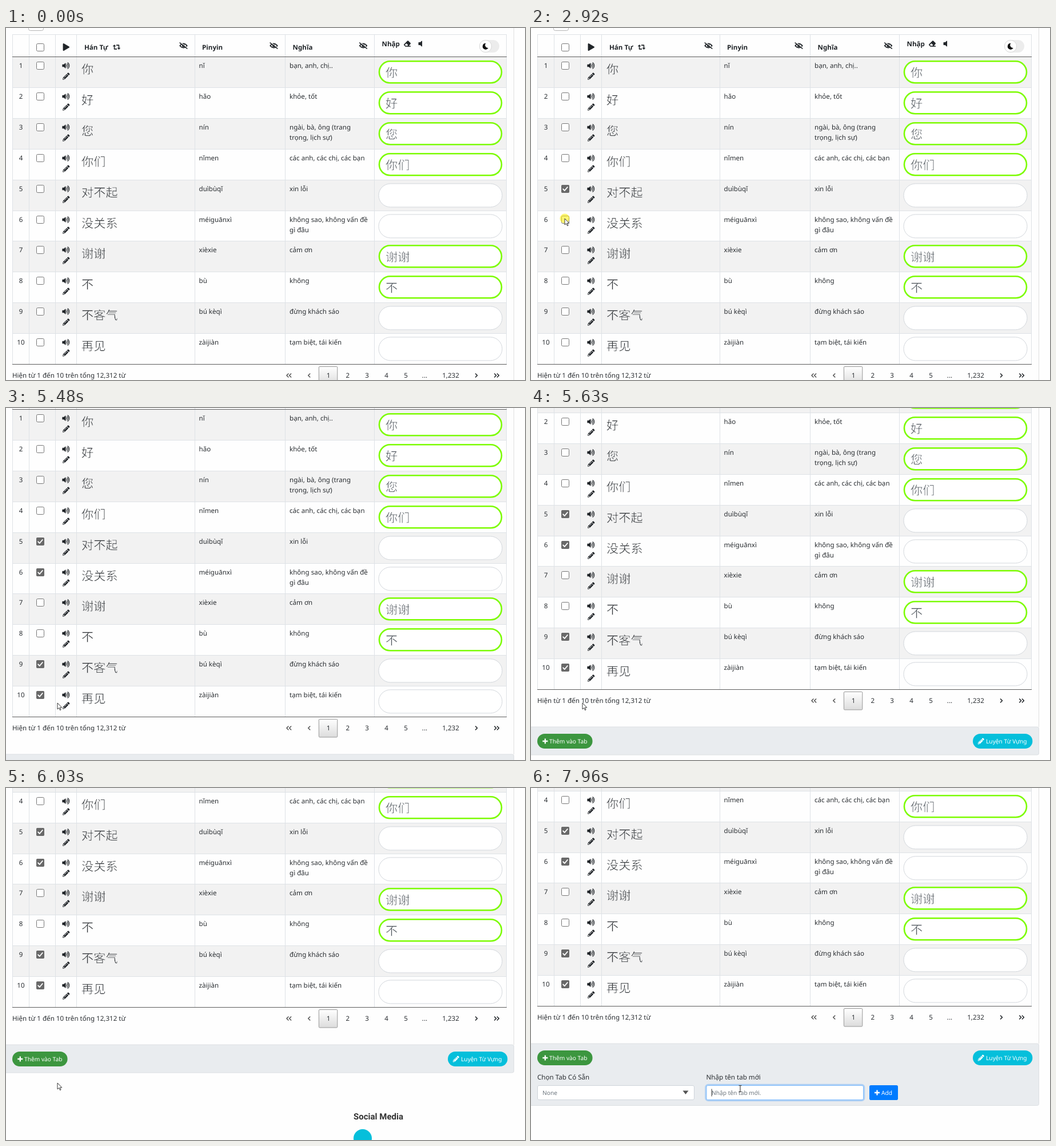
Write an HTML page that moves like this. It is 908x617 px and loops after 7990 ms.

```html
<!DOCTYPE html>
<html lang="vi">
<head>
<meta charset="utf-8">
<title>Vocabulary table</title>
<style>
  html, body { margin: 0; width: 100%; height: 100%; overflow: hidden; background: #fefefe; }
  svg { display: block; width: 908px; height: 617px; }
  text { font: 11.6px "Noto Sans", "Open Sans", sans-serif; fill: #2a2e32;
         text-rendering: geometricPrecision; white-space: pre; }
  .b { font-weight: 700; fill: #212529; }
  .s { font-size: 10.2px; }
  .w { fill: #fff; }
  .m { text-anchor: middle; }
  .g { fill: #6c757d; }
  /* a paper-coloured stroke thins the strokes of the characters */
  .zh { font: 300 21.2px "Noto Sans CJK SC", "Noto Sans CJK", "Noto Sans CJK JP", sans-serif;
        stroke: #fefefe; stroke-width: .6; }
  .odd { stroke: #f2f2f2; }
  .in { fill: #495057; stroke: #fff; }
  .soc { font: 700 15px Roboto, sans-serif; fill: #333; }
</style>
</head>
<body>
<svg id="stage" viewBox="0 0 908 617" xmlns="http://www.w3.org/2000/svg"></svg>
<script>
const LOOP = 7990, PITCH = 53.9, GROW = 59.5, FOOT = 655;
const INK = '#212529', LINE = '#dee2e6', DARK = '#5c5c5c';

const rows = [
  ['你', 'nǐ', 'bạn, anh, chị..', 1],
  ['好', 'hǎo', 'khỏe, tốt', 1],
  ['您', 'nín', 'ngài, bà, ông (trang|trọng, lịch sự)', 1],
  ['你们', 'nǐmen', 'các anh, các chị, các bạn', 1],
  ['对不起', 'duìbùqǐ', 'xin lỗi', 0],
  ['没关系', 'méiguānxì', 'không sao, không vấn đề|gì đâu', 0],
  ['谢谢', 'xièxie', 'cảm ơn', 1],
  ['不', 'bù', 'không', 1],
  ['不客气', 'bú kèqì', 'đừng khách sáo', 0],
  ['再见', 'zàijiàn', 'tạm biệt, tái kiến', 0]
];

// start, end, x, y, sideways bend
const moves = [
  [90, 880, 48, 311, 0], [900, 1080, 56, 275, 0], [1080, 1170, 58, 281, 0],
  [2050, 2630, 59, 331, 2], [2680, 2710, 59, 334, 0],
  [3320, 4070, 61, 496, 13], [4380, 4850, 65, 546, 0], [4850, 4960, 63, 548, 0],
  [5190, 5350, 90, 517, 0], [6150, 6580, 75, 471, 0], [6990, 7360, 366, 527, 0]
];
const clicks = [1840, 2920, 4170, 4980, 6600, 7540], HOLD = 190;
const checks = { 5: 2030, 6: 3110, 9: 4360, 10: 5170 };
const scrolls = [[5330, 0], [5630, 95.5], [5820, 154], [6030, 205], [6090, 207]];

// Icon outlines on a 512 grid
const speaker = 'M215 71L126 160H24q-24 0-24 24v144q0 24 24 24h102l89 89c15 15 41 4 41-17V88c0-21-26-32-41-17z';
const pencil = 'M498 142l-46 46q-9 8-17 0L324 77q-8-9 0-17l46-46q34-28 68 0l60 60q28 34 0 68zM284 100L22 362 0 484q0 28 28 28l122-22 262-262q8-9 0-17L301 100q-9-8-17 0zM124 340q-8-10 0-20l154-154q10-8 20 0q8 10 0 20L144 340q-10 8-20 0zM88 424h48v36l-64 11-31-31 11-64h36z';
const eraser = 'M498 274c19-19 19-49 0-68L338 46c-19-19-49-19-68 0L14 302c-19 19-19 49 0 68l96 96c9 9 21 14 34 14h356q12 0 12-12v-40q0-12-12-12H376zM195 239l118 118-50 59H152l-80-80z';
const plus = 'M416 208H272V64h-96v144H32v96h144v144h96V304h144z';
const play = 'M424 215L72 7C44-10 0 6 0 48V464c0 38 41 60 72 41l352-208c32-18 32-64 0-82z';

const rect = (x, y, w, h, fill, more = '') =>
  `<rect x="${x}" y="${y}" width="${w}" height="${h}" fill="${fill}" ${more}/>`;
const text = (x, y, s, cls = '') => `<text x="${x}" y="${y}" class="${cls}">${s}</text>`;
const path = (d, fill, more = '') => `<path d="${d}" fill="${fill}" ${more}/>`;
const stroke = (d, w, color = INK) =>
  path(d, 'none', `stroke="${color}" stroke-width="${w}" stroke-linecap="round" stroke-linejoin="round"`);
const icon = (body, w, cx, cy, k = .024) =>
  `<g transform="translate(${cx} ${cy}) scale(${k}) translate(${-w / 2} -256)">${body}</g>`;
const glyph = (d, w, cx, cy, k, fill = INK) => icon(path(d, fill, 'fill-rule="evenodd"'), w, cx, cy, k);

const volume = (x, y) => icon(path(speaker, INK) +
  stroke('M308 200a67 67 0 0 1 0 112M353 117a165 165 0 0 1 0 278M397 40a258 258 0 0 1 0 432', 46), 576, x, y);
const hidden = (x, y) => icon(
  stroke('M40 256Q320-60 600 256Q320 572 40 256z', 78) +
  `<circle cx="320" cy="256" r="112" fill="${INK}"/>` +
  stroke('M75 0L645 445', 46, '#fefefe') + stroke('M34 30L606 482', 64), 640, x, y, .0225);
const swap = (x, y) => icon(
  stroke('M320 400H152V160M320 112H488V352', 66) +
  path('M30 200L152 60 274 200zM366 312L488 452 610 312z', INK), 640, x, y, .0235);

const box = (y) => rect(53.5, y - 6.5, 13, 13, '#fff', 'rx="2" stroke="#767676"');
const tick = (n, y) => `<g id="tick${n}">` + rect(53, y - 7, 14, 14, '#696969', 'rx="2"') +
  stroke(`M56.2 ${y + .3}l2.6 2.7 5-6`, 1.9, '#fff') + '</g>';

function header() {
  return rect(39.5, -10, 26, 14.5, '#fff', 'rx="3" stroke="#b5b5b5"') +
    rect(11, 11, 865, 1, LINE) + box(34) + glyph(play, 448, 105.3, 33.5, .0255) +
    text(137, 38, 'Hán Tự', 'b') + swap(193.5, 33.5) + hidden(310.5, 31) +
    text(343, 38, 'Pinyin', 'b') + hidden(468.5, 31) +
    text(501.5, 38, 'Nghĩa', 'b') + hidden(625, 31) +
    text(657.5, 32, 'Nhập', 'b') + glyph(eraser, 512, 702, 27.5, .0235) +
    glyph(speaker, 256, 724.8, 27.5, .0255) +
    rect(828, 21, 35, 22, '#ececec', 'rx="11"') +
    '<circle cx="839" cy="32" r="10.6" fill="#fff" stroke="#d0d0d0" stroke-width=".8"/>' +
    path('M839.6 26.8a5.4 5.4 0 1 0 4.2 8.2a4.9 4.9 0 0 1-4.2-8.2z', '#111');
}

function row([zh, py, vi, done], i) {
  const o = Math.round(i * PITCH), n = i + 1, cy = 66 + o;
  const [a, b] = vi.split('|');
  const pill = done
    ? rect(653, 58.3 + o, 214, 38, '#fff', 'rx="19" stroke="#7cfc00" stroke-width="2.6"')
    : rect(652, 56.9 + o, 216, 41, '#fff', 'rx="20.5" stroke="#d3d7dc"');
  return text(26, 70 + o, n, 'm') + box(cy) + (checks[n] ? tick(n, cy) : '') +
    volume(105.3, cy) + glyph(pencil, 512, 105.3, 84.5 + o) +
    text(132, 80 + o, zh, i % 2 ? 'zh' : 'zh odd') + text(337.5, 70 + o, py) + text(496, 70 + o, a) +
    (b ? text(496, 88 + o, b) : '') + pill + (done ? text(664, 85.5 + o, zh, 'zh in') : '');
}

function table() {
  let s = '';
  rows.forEach((_, i) => {
    const y = 50 + Math.round(i * PITCH);
    if (i % 2 === 0) s += rect(11, y, 865, 54, '#f2f2f2');
  });
  rows.forEach((_, i) => { if (i) s += rect(11, 50 + Math.round(i * PITCH), 865, 1, LINE); });
  for (const x of [11, 40, 86, 123, 330, 488, 644, 875]) s += rect(x, 11, 1, 578, LINE);
  return s + rect(11, 50, 865, 1, DARK) + rect(11, 589, 865, 1, DARK) + header() + rows.map(row).join('');
}

function pager() {
  const chev = (x, d, c) => stroke(`M${x + 1.5 * d} 606L${x - 1.5 * d} 609L${x + 1.5 * d} 612`, 1.6, c);
  let s = text(11, 613, 'Hiện từ 1 đến 10 trên tổng 12,312 từ') +
    rect(547.4, 593.5, 32.4, 31.5, 'url(#page)', 'rx="1.5" stroke="#979797"');
  [['1', 564], ['2', 597.7], ['3', 631.5], ['4', 665.5], ['5', 699.5], ['...', 732.5], ['1,232', 778]]
    .forEach(([n, x]) => s += text(x, 613, n, 'm'));
  return s + chev(492.5, 1, '#555') + chev(497.2, 1, '#555') + chev(530.3, 1, '#555') +
    chev(823, -1, INK) + chev(856.2, -1, INK) + chev(860.9, -1, INK);
}

function footer() {
  return rect(888, 0, 1, FOOT, '#dfdfdf') +
    `<rect id="foot" x="-5" y="${FOOT}" width="893.5" height="49" rx="3" fill="#e9ecef" stroke="#dcdfe2"/>` +
    rect(9.8, 665.8, 99, 28.4, '#28a745', 'id="ring" rx="14.2" fill-opacity=".5"') +
    rect(11, 667, 96.6, 26, '#3c963f', 'rx="13"') + glyph(plus, 448, 24.8, 680, .0235, '#fff') +
    text(32, 684, 'Thêm vào Tab', 's w') +
    rect(773, 667, 104.4, 26, '#05bfdb', 'rx="13"') + glyph(pencil, 512, 787.3, 680, .0215, '#fff') +
    text(796, 684, 'Luyện Từ Vựng', 's w');
}

// Drawn at its open position, 207px above page coordinates
function panel() {
  return '<g clip-path="url(#slide)"><g transform="translate(0 207)">' +
    text(11, 510.5, 'Chọn Tab Có Sẵn') + rect(11.5, 521.5, 274, 25, '#fff', 'rx="2.5" stroke="#ced4da"') +
    text(20, 537.8, 'None', 's g') + path('M265.5 530.5h10l-5 6.5z', '#555') +
    text(306.5, 510.5, 'Nhập tên tab mới') +
    rect(306.5, 521, 275.5, 26, 'none', 'id="glow" rx="3.5" stroke="#007bff" stroke-opacity=".25" stroke-width="4.5"') +
    rect(307, 521.5, 274.5, 25, '#fff', 'id="field" rx="2.5" stroke="#ced4da"') +
    text(316, 537.8, 'Nhập tên tab mới.', 's g') + rect(315.6, 527.5, 1, 13, '#333', 'id="caret"') +
    rect(592, 521, 50, 26, '#007bff', 'rx="2.8"') + glyph(plus, 448, 605.5, 534, .0235, '#fff') +
    text(613, 537.8, 'Add', 's w') + '</g></g>';
}

const social = () => '<g id="social">' + text(608, 786, 'Social Media', 'soc') +
  '<circle cx="624" cy="819" r="16" fill="#05bfdb"/></g>';

const outline = 'stroke="#222" stroke-width=".9" stroke-linejoin="round"';
const pointers =
  '<circle id="spot" r="8.5" fill="#ffee00" fill-opacity=".55"/><g id="mouse">' +
  path('M0 0V11L2.6 8.7 4.5 12.7 6.1 12 4.3 8.1H7.8z', '#fff', `id="arrow" ${outline}`) +
  path('M-1.3 8V.8a1.3 1.3 0 0 1 2.6 0V5l4.6 1.1q1.1.4 1 1.7l-.6 3.4-1 2.3V15H-1v-1.5L-4.4 9q-.6-1.4.8-1.6z',
    '#fff', `id="hand" ${outline}`) +
  stroke('M-2-5.5H-.5L0-5 .5-5.5H2M0-5V5M-2 5.5H-.5L0 5 .5 5.5H2', 1, '#222').replace('<path', '<path id="beam"') +
  '</g>';

document.getElementById('stage').innerHTML =
  '<defs><linearGradient id="page" x2="0" y2="1"><stop stop-color="#fff"/><stop offset="1" stop-color="#dcdcdc"/>' +
  `</linearGradient><clipPath id="slide"><rect id="window" x="0" y="${FOOT}" width="888" height="49"/></clipPath></defs>` +
  '<g id="scroll">' + table() + pager() + footer() + panel() + social() + '</g>' + pointers;

const el = (id) => document.getElementById(id);
const set = (id, k, v) => el(id).setAttribute(k, v);
const show = (id, on) => set(id, 'visibility', on ? 'visible' : 'hidden');
const part = (t, a, b) => Math.min(1, Math.max(0, (t - a) / (b - a)));
const swing = (p) => .5 - Math.cos(p * Math.PI) / 2;

function scrollAt(t) {
  let y = 0;
  for (let i = 1; i < scrolls.length; i++) {
    const [a, from] = scrolls[i - 1], [b, to] = scrolls[i];
    y += (to - from) * part(t, a, b);
  }
  return Math.round(y);
}

function mouseAt(t) {
  let x = 870, y = 608;
  for (const [a, b, tx, ty, bend] of moves) {
    if (t < a) break;
    const e = swing(part(t, a, b));
    x += (tx - x) * e + bend * Math.sin(Math.PI * e);
    y += (ty - y) * e;
  }
  return [x, y];
}

function draw(t) {
  const top = scrollAt(t), [x, y] = mouseAt(t);
  set('scroll', 'transform', `translate(0 ${-top})`);
  for (const n in checks) show('tick' + n, t >= checks[n]);

  const open = swing(part(t, 6790, 7190)) * GROW;
  set('foot', 'height', 49 + open);
  set('window', 'height', 49 + open);
  set('social', 'transform', `translate(0 ${open})`);

  const focus = part(t, 7540, 7690);
  set('ring', 'opacity', part(t, 6600, 6750) * (1 - focus));
  set('glow', 'opacity', focus);
  set('field', 'stroke', focus > .5 ? '#80bdff' : '#ced4da');
  show('caret', t >= 7540);

  const overButton = x > 11 && x < 107 && y > 667 - top && y < 693 - top;
  const overField = open > 55 && x > 307 && x < 582 && y > 520 && y < 548;
  const on = t >= 90;
  show('arrow', on && !overButton && !overField);
  show('hand', on && overButton);
  show('beam', on && overField);
  const at = `translate(${x.toFixed(1)} ${y.toFixed(1)})`;
  set('mouse', 'transform', at);
  set('spot', 'transform', at);
  show('spot', clicks.some((c) => t >= c && t < c + HOLD));
}

const start = performance.now();
function tickFrame() {
  draw((performance.now() - start) % LOOP);
  requestAnimationFrame(tickFrame);
}
tickFrame();
</script>
</body>
</html>
```
